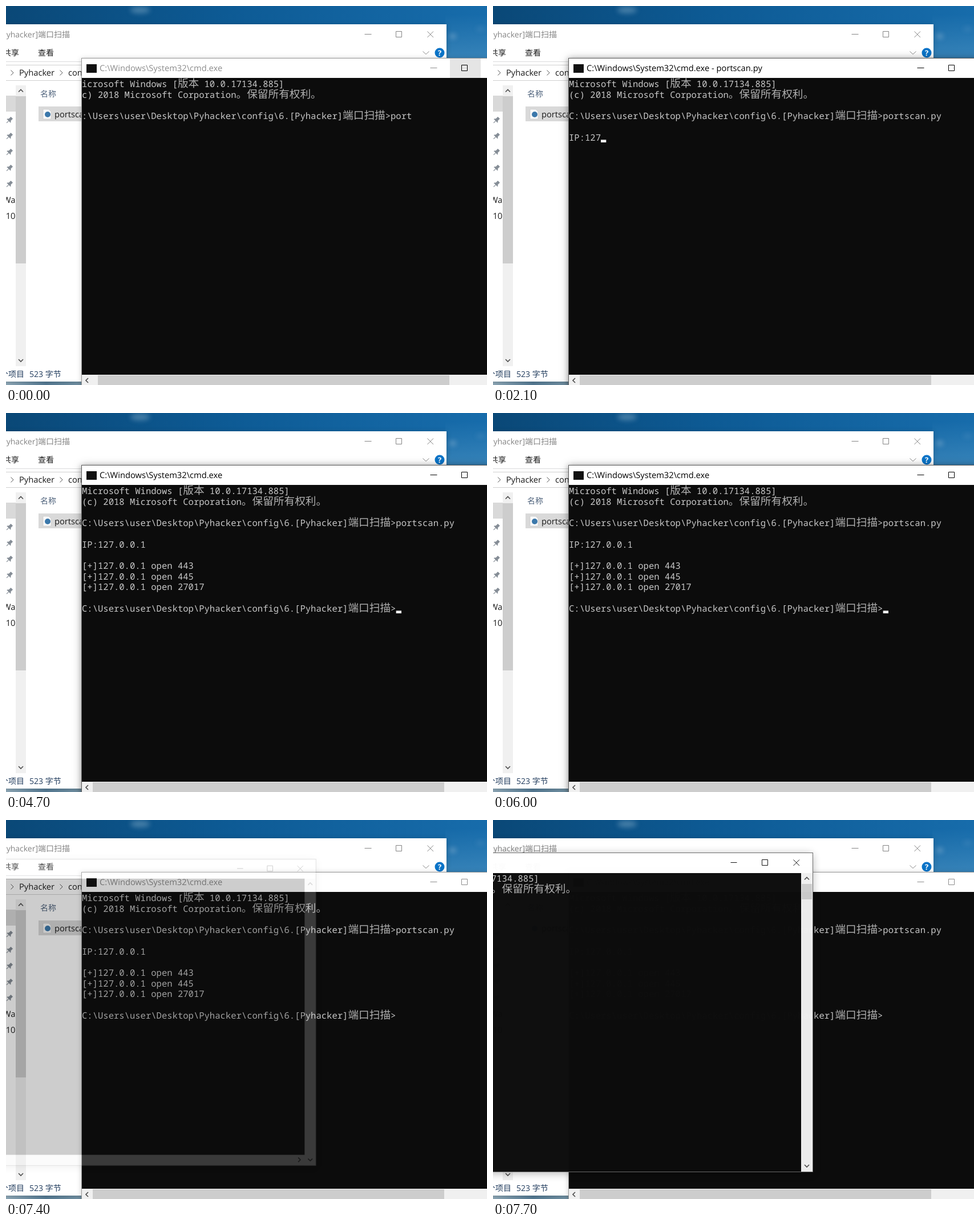
An HTML page for the animation above (8000 ms loop, 843x664 px).

```html
<!DOCTYPE html>
<html lang="zh-CN">
<head>
<meta charset="utf-8">
<title>Port scan</title>
<style>
  html, body { margin: 0; width: 100%; height: 100%; overflow: hidden; background: #0b5590; }
  svg { display: block; width: 100%; height: 100%; }
  text { white-space: pre; text-rendering: geometricPrecision; }
  .ui { font: 14.7px "Open Sans", "Noto Sans CJK SC", "Noto Sans CJK", sans-serif; fill: #1a1a1a; }
  .ui.cn { font-size: 14px; }
  .con { font: 300 15.5556px "Noto Sans Mono", "Liberation Mono", monospace; fill: #c8c8c8; }
  .con tspan { font: 300 18.6667px "Noto Sans CJK SC", "Noto Sans CJK", sans-serif; fill: #b0b0b0; }
  .line { fill: none; stroke-width: 1; }
  .arrow { fill: none; stroke: #505050; stroke-width: 1.7; }
  .soft { filter: drop-shadow(0 1px 4px rgba(0, 0, 0, .2)); }
  .deep { filter: drop-shadow(0 2px 8px rgba(0, 0, 0, .3)); }
</style>
</head>
<body>
<svg id="stage" viewBox="0 0 843 664" preserveAspectRatio="none">
  <defs>
    <linearGradient id="sky">
      <stop offset="0" stop-color="#0a4877"/>
      <stop offset=".45" stop-color="#0d5a94"/>
      <stop offset="1" stop-color="#176cab"/>
    </linearGradient>
    <linearGradient id="haze" x2="0" y2="1">
      <stop offset="0" stop-color="#6aa9d0" stop-opacity="0"/>
      <stop offset="1" stop-color="#6aa9d0" stop-opacity=".4"/>
    </linearGradient>
    <linearGradient id="shore">
      <stop offset="0" stop-color="#8fa9b8"/>
      <stop offset=".5" stop-color="#557b95"/>
      <stop offset="1" stop-color="#7897a8"/>
    </linearGradient>
    <filter id="blur" x="-1" y="-1" width="3" height="3"><feGaussianBlur stdDeviation="4"/></filter>
    <clipPath id="screen"><rect x="133" y="126" width="710" height="520"/></clipPath>
  </defs>

  <rect width="843" height="664" fill="url(#sky)"/>
  <rect x="770" y="15" width="73" height="80" fill="url(#haze)"/>
  <rect y="656" width="140" height="8" fill="url(#shore)"/>
  <g filter="url(#blur)" fill="#9fc0d8">
    <ellipse cx="235" cy="7" rx="17" ry="6" opacity=".4"/>
    <ellipse cx="783" cy="53" rx="6" ry="4" opacity=".5"/>
    <ellipse cx="832" cy="40" rx="8" ry="3" opacity=".2"/>
  </g>

  <g id="explorer">
    <rect class="soft" x="-30" y="32" width="802" height="626" fill="#fff"/>
    <path class="line" stroke="#dadbdc" d="M0 97.5H132"/>
    <path class="line" stroke="#d0d0d0" d="M0 103.5H132M0 130.5H132"/>
    <circle cx="760" cy="82" r="8.5" fill="#0a74c8"/>
    <text class="ui" x="760" y="87" text-anchor="middle" style="fill:#fff;font-weight:700;font-size:13px">?</text>
    <path class="line" stroke="#8a8a8a" d="M730.5 79.5l5.5 5 5.5-5"/>
    <path class="line" stroke="#555" d="M8.5 112.5l4.5 4.5-4.5 4.5M94.5 112.5l4.5 4.5-4.5 4.5"/>
    <rect y="157" width="17" height="28" fill="#d9d9d9"/>
    <rect x="17" y="139" width="18" height="492" fill="#f0f0f0"/>
    <rect x="17" y="158" width="18" height="293" fill="#cdcdcd"/>
    <path class="arrow" d="M22 150.5l4-4 4 4M22 619l4 4 4-4"/>
    <rect x="57" y="176" width="80" height="26" fill="#d9d9d9"/>
    <path d="M65 181h10l4 4v13h-14z" fill="#fafafa" stroke="#c4c4c4" stroke-width=".6"/>
    <circle cx="73" cy="190" r="5" fill="#3b78ab"/>
    <text class="ui cn" x="112" y="55" text-anchor="end" style="fill:#858585">6.[Pyhacker]端口扫描</text>
    <text class="ui cn" x="-5" y="86.5">共享</text>
    <text class="ui cn" x="56" y="86.5">查看</text>
    <text class="ui" x="23" y="121.5">Pyhacker</text>
    <text class="ui" x="109" y="121.5">config</text>
    <text class="ui cn" x="60" y="159" style="fill:#4c607a">名称</text>
    <text class="ui" x="85" y="194.5">portscan.py</text>
    <text class="ui" x="16.5" y="345" text-anchor="end">Wa</text>
    <text class="ui" x="16.5" y="373" text-anchor="end">10</text>
    <text class="ui cn" x="32" y="650" text-anchor="end" style="fill:#1e395b">1 个项目</text>
    <text class="ui cn" x="41" y="650" style="fill:#1e395b">523 字节</text>
  </g>

  <g id="console">
    <rect class="soft" x="132" y="91" width="740" height="600" fill="#fff"/>
    <rect id="glow" class="deep" x="132" y="91" width="740" height="600" fill="#fff"/>
    <rect id="edge" class="line" x="132.5" y="91.5" width="740" height="600"/>
    <rect id="hover" x="778" y="92" width="54" height="34" fill="#e5e5e5"/>
    <rect x="141" y="102" width="18" height="15" fill="#111"/>
    <text id="title" class="ui" x="164" y="114"></text>
    <path id="min" class="line" d="M743.5 108.5h12"/>
    <path id="max" class="line" d="M798.5 103.5h10v10h-10z"/>
    <rect x="133" y="126" width="710" height="520" fill="#0c0c0c"/>
    <rect x="133" y="646" width="710" height="18" fill="#f0f0f0"/>
    <rect id="thumb" y="647" width="616" height="17" fill="#cdcdcd"/>
    <path class="arrow" d="M144 652l-4 4 4 4"/>
    <g clip-path="url(#screen)">
      <g id="rows"></g>
      <rect id="cursor" width="9.333" height="4.667" fill="#f2f2f2"/>
    </g>
  </g>

  <g id="popup">
    <rect class="deep" x="-30" y="635" width="114" height="60" fill="#fff"/>
    <rect class="line" x="-30.5" y="635.5" width="115" height="60" stroke="#777"/>
    <path class="line" stroke="#222" style="stroke-width:1.2" d="M59 647l11 11M70 647l-11 11"/>
  </g>

  <g id="peek">
    <rect class="deep" x="-284" y="58" width="844" height="559" fill="#fff"/>
    <rect x="-284" y="93" width="824" height="524" fill="#0c0c0c"/>
    <rect x="540" y="93" width="20" height="524" fill="#f0f0f0"/>
    <path class="line" stroke="#111" d="M416.5 74.5h11M471.5 69.5h10v10h-10zM526.5 69.5l10.5 10.5M537 69.5l-10.5 10.5"/>
    <g id="early">
      <rect x="-284" y="597" width="844" height="20" fill="#f0f0f0"/>
      <path class="arrow" d="M528 602l4 4-4 4"/>
    </g>
    <path class="arrow" d="M546 104.5l4-4 4 4M546 604l4 4 4-4"/>
    <g id="late">
      <rect x="541" y="112" width="18" height="27" fill="#cdcdcd"/>
      <g id="banner"></g>
    </g>
    <rect class="line" x="-284.5" y="57.5" width="845" height="559" stroke="#6a6a6a"/>
  </g>
</svg>

<script>
const $ = id => document.getElementById(id);
const CELL = 28 / 3, ROW = 56 / 3, LOOP = 8000;
const banner = ['Microsoft Windows [版本 10.0.17134.885]', '(c) 2018 Microsoft Corporation。保留所有权利。'];
const prompt = 'C:\\Users\\user\\Desktop\\Pyhacker\\config\\6.[Pyhacker]端口扫描>';
const hits = [443, 445, 27017].map(port => `[+]127.0.0.1 open ${port}`);

// Typing on the address line, with or without the cursor behind it.
const ip = (n, on = true) => ({ ip: 'IP:127.0.0.1'.slice(0, n), cur: on ? [n, 5] : null });

const steps = [
  [0, { active: 0, hover: 1, shift: 1, cmd: 'port', title: '', ip: '', hits: 0, done: false, cur: null, popup: 0, peek: null }],
  [100, { active: .5, hover: .5 }],
  [200, { active: 1, hover: 0, cur: [63, 3] }],
  [700, { cmd: 'portscan.py', cur: [70, 3] }],
  [1200, { shift: 0, title: ' - portscan.py', cur: [0, 4] }],
  [1300, ip(3)],
  [1800, ip(4)],
  [1900, ip(5)],
  [2100, ip(6)],
  [2200, ip(7)],
  [2300, ip(7, false)],
  [2500, ip(8)],
  [2600, ip(9)],
  [2700, ip(10)],
  [3100, ip(11, false)],
  [3200, ip(11)],
  [3600, ip(12, false)],
  [3900, { cur: [0, 6] }],
  [4000, { cur: [0, 7] }],
  [4300, { hits: 2, cur: [0, 9] }],
  [4500, { hits: 3, cur: [0, 10] }],
  [4700, { title: '', done: true, cur: [59, 11] }],
  [5600, { cur: null }],
  [6000, { cur: [59, 11] }],
  [6500, { active: .5, cur: null }],
  [6600, { active: 0, popup: .3 }],
  [6700, { popup: .7 }],
  [6800, { popup: .96 }],
  [7400, { popup: 0, peek: [.96, .2] }],
  [7500, { peek: [.987, .75] }],
  [7600, { peek: [.997, .93] }],
  [7700, { peek: [1, .985] }]
];

const rowText = (s, row, x, top) =>
  `<text class="con" x="${x}" y="${top + row * ROW + 15.2}">` +
  s.replace(/>/g, '&gt;').replace(/[^\x00-\x7f]+/g, m => `<tspan>${m}</tspan>`) + '</text>';

const block = (lines, x, top) => lines.map((s, i) => s && rowText(s, i, x, top)).join('');
const gray = v => `rgb(${v},${v},${v})`;

// Pushpins and caption buttons of the file window.
$('explorer').insertAdjacentHTML('beforeend',
  [0, 1, 2, 3, 4].map(i => `<g transform="translate(6 ${200 + 28 * i}) rotate(45)" fill="#858d96">
    <path d="M-2.5-6h5v5l2 2v1h-9v-1l2-2z"/><path d="M-.6 2h1.2v5h-1.2z"/></g>`).join('') +
  `<path class="line" stroke="#858585" d="M628.5 49.5h12M683.5 44.5h10v10h-10zM738.5 44.5l10.5 10.5M749 44.5l-10.5 10.5"/>`);
$('banner').innerHTML = block(banner, -283, 93);

function draw(s) {
  const ink = gray(Math.round(140 * (1 - s.active)));
  $('glow').style.opacity = s.active;
  $('edge').style.stroke = gray(Math.round(150 - 60 * s.active));
  $('hover').style.opacity = s.hover;
  $('title').textContent = 'C:\\Windows\\System32\\cmd.exe' + s.title;
  $('title').style.fill = ink;
  $('min').style.stroke = ink;
  $('max').style.stroke = s.hover ? '#000' : ink;
  $('thumb').setAttribute('x', 152 + 9 * s.shift);

  const left = 133 - CELL * s.shift;
  const lines = [...banner, '', prompt + s.cmd, '', s.ip, '', ...hits.slice(0, s.hits)];
  if (s.done) lines.push('', prompt);
  $('rows').innerHTML = block(lines, left, 127);

  const cursor = $('cursor');
  cursor.style.display = s.cur ? '' : 'none';
  if (s.cur) {
    cursor.setAttribute('x', left + s.cur[0] * CELL);
    cursor.setAttribute('y', 127 + s.cur[1] * ROW + 14);
  }

  $('popup').style.opacity = s.popup;
  $('peek').style.display = s.peek ? '' : 'none';
  if (s.peek) {
    const [scale, alpha] = s.peek;
    $('peek').setAttribute('transform', `translate(130 337) scale(${scale}) translate(-130 -337)`);
    $('peek').style.opacity = alpha;
    $('early').style.display = scale < .97 ? '' : 'none';
    $('late').style.display = scale < .97 ? 'none' : '';
  }
}

const start = performance.now();
let shown = 0;
function tick() {
  const t = (performance.now() - start) % LOOP;
  const past = steps.filter(([at]) => at <= t);
  if (past.length !== shown) {
    shown = past.length;
    draw(Object.assign({}, ...past.map(([, change]) => change)));
  }
  requestAnimationFrame(tick);
}
tick();
</script>
</body>
</html>
```
